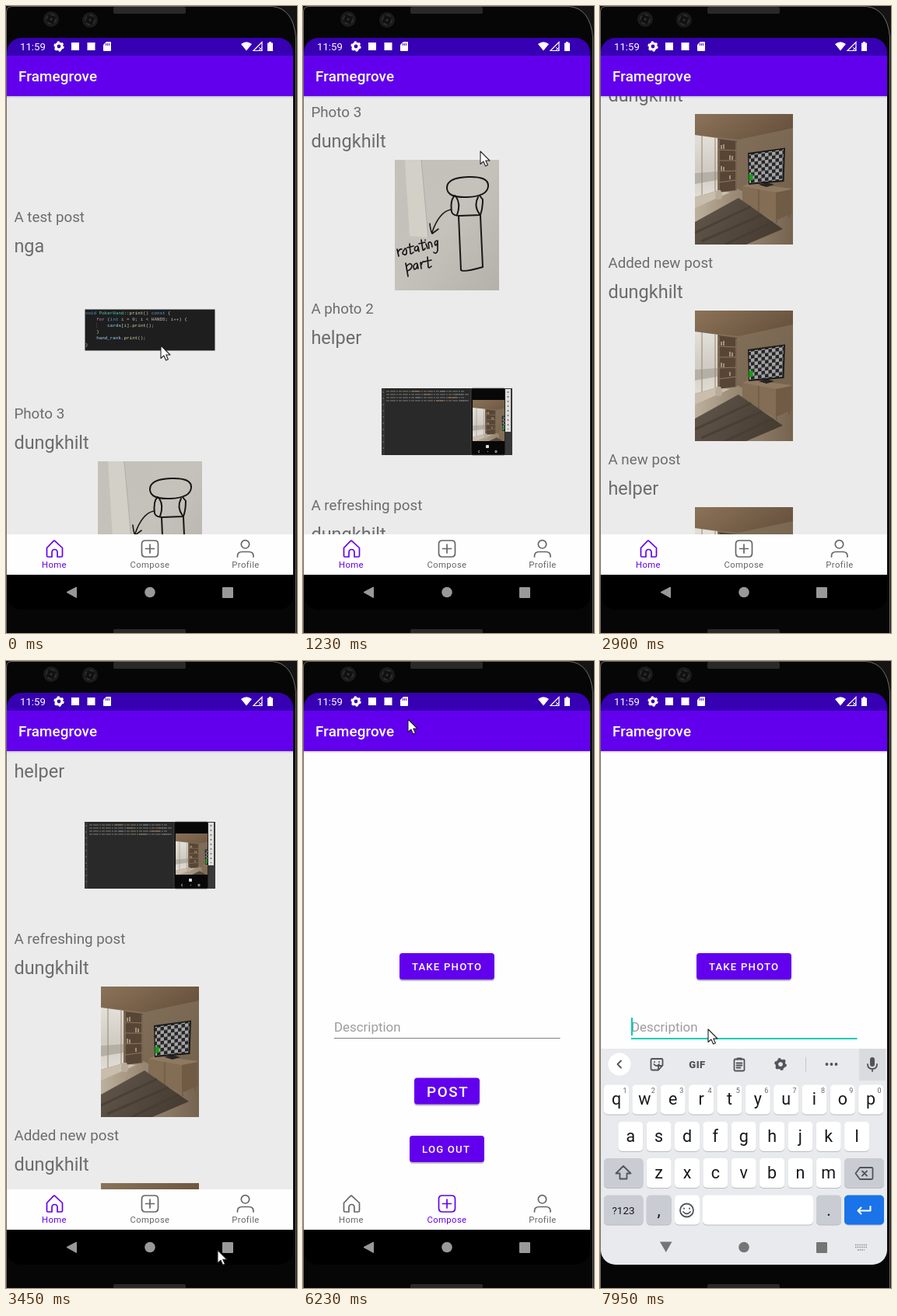
Animation of 374x807 px, one loop 8000 ms. Source, as an HTML page:

```html
<!DOCTYPE html>
<html lang="en">
<head>
<meta charset="utf-8">
<title>Photo feed</title>
<style>
html, body { margin: 0; width: 100%; height: 100%; overflow: hidden; background: #000; }
svg { display: block; width: 374px; height: 807px; font-family: Roboto, sans-serif; }
svg svg { width: auto; height: auto; }
.line { fill: none; stroke: currentColor; stroke-width: 1.7; stroke-linejoin: round; stroke-linecap: round; }
.desc { font-size: 18.8px; fill: #6c6c6c; }
.user { font-size: 23.5px; fill: #6c6c6c; }
.code { font: 5.9px "Liberation Mono", monospace; fill: #c4c4c4; white-space: pre; }
.tab { font-size: 11.3px; letter-spacing: .38px; text-anchor: middle; fill: currentColor; }
.btn { font-weight: 500; font-size: 13.2px; letter-spacing: 1.18px; fill: #fff; }
.key { font-size: 21.5px; text-anchor: middle; fill: #17181b; }
.num { font-size: 9px; text-anchor: middle; fill: #5f6368; }
.icon { fill: none; stroke: #50555b; stroke-width: 1.8; stroke-linecap: round; stroke-linejoin: round; }
</style>
</head>
<body>
<svg viewBox="0 0 374 807">
  <defs>
    <clipPath id="screen"><rect x="1" y="41" width="368" height="736" rx="19"/></clipPath>
    <clipPath id="page"><rect x="1" y="116" width="368" height="564"/></clipPath>
    <clipPath id="roomClip"><rect width="126" height="168"/></clipPath>
    <linearGradient id="paper" x2="1" y2="1">
      <stop stop-color="#c3c1ba"/><stop offset=".5" stop-color="#c4c2bb"/><stop offset="1" stop-color="#b3b1aa"/>
    </linearGradient>
    <linearGradient id="ceiling" x2="1" y2=".4">
      <stop stop-color="#8b7358"/><stop offset="1" stop-color="#6a543f"/>
    </linearGradient>
    <linearGradient id="wall" x2="1" y2="1">
      <stop stop-color="#87755f"/><stop offset="1" stop-color="#715e4a"/>
    </linearGradient>
    <linearGradient id="floor">
      <stop stop-color="#bcb09e"/><stop offset=".4" stop-color="#9b8b75"/><stop offset="1" stop-color="#75634f"/>
    </linearGradient>
    <linearGradient id="rug" x2="1" y2=".3">
      <stop stop-color="#62574b"/><stop offset="1" stop-color="#483d33"/>
    </linearGradient>
    <linearGradient id="glass" x2="0" y2="1">
      <stop stop-color="#e3e0da"/><stop offset=".55" stop-color="#d0ccc4"/><stop offset="1" stop-color="#e0ddd6"/>
    </linearGradient>
    <linearGradient id="shade" x2="0" y2="1">
      <stop stop-opacity=".16"/><stop offset="1" stop-opacity="0"/>
    </linearGradient>
    <pattern id="check" width="9" height="9" patternUnits="userSpaceOnUse" patternTransform="skewY(-8)">
      <rect width="9" height="9" fill="#252525"/><path d="M0 0h4.500v9h4.500v-4.500H0z" fill="#a4a4a6"/>
    </pattern>
    <g id="gear">
      <circle r="4" fill="none" stroke="currentColor" stroke-width="3.2"/>
      <circle r="5.7" fill="none" stroke="currentColor" stroke-width="2" stroke-dasharray="2.9 3.07"/>
    </g>
    <g id="room" clip-path="url(#roomClip)">
      <rect width="126" height="168" fill="url(#wall)"/>
      <path d="M0 0H126V18L56 33 0 27z" fill="url(#ceiling)"/>
      <path d="M0 27L29 31V99L0 107z" fill="url(#glass)"/>
      <path d="M0 76L29 74V85L0 90z" fill="#b5b0a6"/>
      <path d="M9 28V105M26 31V100" stroke="#94866f" stroke-width="1"/>
      <path d="M0 107L52 95 126 130V168H0z" fill="url(#floor)"/>
      <path d="M0 107L29 99 45 101 0 121z" fill="#c9bead"/>
      <path d="M30 32L54 35V98L30 101z" fill="#574635"/>
      <path d="M31 46L53 47M31 60H53M31 74L53 73M31 88L53 85M31 33V100M53 36V98" stroke="#8d7660" stroke-width="1.2"/>
      <path d="M34 45V40M37 45V39M45 59V53M48 59V54M34 73V67M37 73V68M45 84V79" stroke="#a09079" stroke-width="2"/>
      <path d="M61 93L70 89 124 96V104L85 101z" fill="#8f7960"/>
      <path d="M61 93L104 101V137L61 118z" fill="#836d54"/>
      <path d="M104 101L124 97V128L104 137z" fill="#705b45"/>
      <path d="M82 97V127M64 119V124M105 137V141M121 129V134" stroke="#604c39" stroke-width=".8"/>
      <path d="M82 91L92 88 102 91 92 94z" fill="#272321"/>
      <path d="M68 50L116 43.5 114.500 87 69 91z" fill="#1c1b1b"/>
      <path d="M69.500 52L114 45.500 112.500 85 70 89z" fill="url(#check)"/>
      <path d="M69.500 78l5-1v8l-5 1z" fill="#12a012"/>
      <path d="M0 139L56 108 113 148 66 168H0z" fill="url(#rug)"/>
      <path d="M0 153L72 119M8 164L86 130M39 168L100 139" stroke="#463b31" stroke-width="3" opacity=".7"/>
      <path d="M28 98q-4 8 0 12h5q4-4 0-12z" fill="#b8ab99"/>
    </g>
    <g id="sketch">
      <rect width="134" height="168" fill="url(#paper)"/>
      <path d="M13 0H34L43 100 19 98z" fill="#d2d0c7"/>
      <path d="M34 0L43 100" stroke="#aeaca5"/>
      <g fill="none" stroke="#171717" stroke-width="2" stroke-linecap="round" stroke-linejoin="round">
        <path d="M67 36Q67 23 94 22T120 34Q119 47 93 48T67 36z"/>
        <path d="M77 46Q71 51 73 67 75 72 83 72L110 71Q113 63 113 51L109 46M79 48Q85 57 80 71M107 48Q101 59 109 70"/>
        <path d="M82 72L85 142Q88 145 113 138L110 72"/>
        <path d="M72 64Q57 67 48 93M45 82Q46 92 48 95L56 89" stroke-width="1.6"/>
        <path d="M3 115l2 9M4 119q2-5 5-4M12 116q-4 5 0 6t3-5-3-1M19 108l1 12q1 2 4-1M16 113l8-2M29 111q-5 1-3 6 4 1 4-5l1 6M34 103l2 13q1 1 3-2M31 108l8-2M40 108l2 6M39 103v.5M44 114l-1-7q4-4 5 5M54 104q-4 1-2 6 3 0 3-6l0 13q-2 5-5 2" stroke-width="1.7"/>
        <path d="M14 133l3 17M15 137q5-6 7-1 0 5-6 7M28 133q-6 2-3 8 4 0 4-7l1 6M33 132l1 8M34 135q1-5 5-4M42 125l1 13q1 2 4-1M38 131l9-2" stroke-width="1.7"/>
      </g>
    </g>
    <g id="code">
      <rect width="167" height="53" fill="#1e1e1e"/>
    </g>
    <g id="shot">
      <rect width="168" height="86" fill="#292929"/>
      <rect width="4" height="86" fill="#353535"/>
      <path d="M2 4V80" stroke="#757575" stroke-dasharray="2 6"/>
      <path d="M6 4H106M6 8H112M6 12H107M6 16H112" stroke="#7d7d77" stroke-width="1.1" stroke-dasharray="4 1 7 1 2 1"/>
      <path d="M39 4h9M54 8h8M85 12h12M70 16h9" stroke="#967050"/>
      <path d="M75 4h7M95 8h10M44 12h6M100 16h8" stroke="#5d7491"/>
      <rect x="115" width="44" height="86" rx="2" fill="#080808" stroke="#565656" stroke-width=".7"/>
      <svg x="117" y="15" width="41" height="53" viewBox="0 6 74 112" preserveAspectRatio="none"><use href="#room"/></svg>
      <path d="M126 83l-2-1.500 2-1.500M136 81.500h1M146 80.500h2v2h-2z" fill="none" stroke="#aaa"/>
      <rect x="134" y="73" width="4" height="4" rx="1" fill="#ddd"/>
      <rect x="159" width="9" height="86" fill="#383838"/>
      <rect x="159" y="1" width="7" height="55" fill="#dededc"/>
      <path d="M162.500 4V53" stroke="#888" stroke-width="2" stroke-dasharray="2 4"/>
    </g>
  </defs>

  <rect width="374" height="807" fill="#141414"/>
  <path d="M.5 808V8Q.5 .5 8 .5H342Q369 3 372.500 40V808z" fill="#060606" stroke="#6e6e6e"/>
  <g fill="#292929">
    <rect x="138" y="1" width="93" height="9" rx="2"/><rect x="138" y="802" width="93" height="9" rx="2"/>
  </g>
  <g id="lenses"></g>

  <g clip-path="url(#screen)">
    <rect y="41" width="374" height="740" fill="#000"/>
    <rect y="41" width="374" height="23" fill="#3700b3"/>
    <rect y="64" width="374" height="52" fill="#6200ee"/>
    <g fill="#fff" color="#fff">
      <text x="18" y="57" font-size="13.2">11:59</text>
      <use href="#gear" x="68" y="52"/>
      <rect x="84" y="47" width="10" height="10"/><rect x="104.500" y="47" width="10" height="10"/>
      <path d="M129 46h5q1 0 1 1v10q0 1-1 1h-8q-1 0-1-1v-7z"/>
      <path d="M128.500 48v3M130.500 48v3M132.500 48v3" stroke="#3700b3" stroke-width=".9"/>
      <path d="M302 49q7-5.500 14 0l-7 8.500z"/>
      <path d="M318 57.500L329 46.500V57.500z" fill="none" stroke="#fff" stroke-width="1.200"/>
      <path d="M325 53l4 4M329 53l-4 4" stroke="#fff"/>
      <path d="M336 47.500h2v-1.500h3v1.500h2v10.500h-7z"/>
      <text x="16" y="97" font-weight="500" font-size="18.8" letter-spacing=".14">Framegrove</text>
    </g>

    <g clip-path="url(#page)">
      <rect y="116" width="374" height="564" fill="#ebebeb"/>
      <g id="feed"></g>
    </g>

    <g id="compose">
      <rect y="116" width="374" height="564" fill="#fefefe"/>
      <g id="buttons"></g>
      <text x="40" y="477" font-size="16.9" fill="#9c9c9c">Description</text>
      <rect id="rule" x="40" y="485" width="290.500"/>
      <rect id="caret" x="40" y="459" width="2" height="23" fill="#03cdbb"/>
    </g>
    <rect y="116" width="374" height="3" fill="url(#shade)"/>

    <rect y="680" width="374" height="52" fill="#fefefe"/>
    <g id="homeTab">
      <path class="line" d="M52.500 697.500L60.800 688.800Q62 687.500 63.200 688.800L72.500 697.500V707.500Q72.500 709 71 709H66V703.500Q66 699.500 62.500 699.500T59 703.500V709H54Q52.500 709 52.500 707.500z"/>
      <text class="tab" x="62" y="722.500">Home</text>
    </g>
    <g id="composeTab">
      <path class="line" d="M179 688h12q4.500 0 4.500 4.500v11.500q0 5-4.500 5h-12q-4.500 0-4.500-5v-11.500q0-4.500 4.500-4.500zM185 693v11M179.500 698.500h11"/>
      <text class="tab" x="185" y="722.500">Compose</text>
    </g>
    <g color="#666">
      <circle class="line" cx="307.500" cy="692.800" r="5.200"/>
      <path class="line" d="M297.500 709v-1q0-5.500 6-5.500h8.500q6 0 6 5.500v1"/>
      <text class="tab" x="308" y="722.500">Profile</text>
    </g>
    <g fill="#999" stroke-linejoin="round">
      <path d="M78 754.500L90.500 748V761.500z" stroke="#999"/><circle cx="185" cy="754.500" r="6.800"/><rect x="278" y="748" width="14" height="14" rx="1"/>
    </g>

    <g id="keyboard">
      <rect y="499" width="374" height="280" fill="#e8eaed"/>
      <rect x="333" y="499" width="34" height="41" fill="#d9dbdf"/>
      <circle cx="25" cy="519" r="14.500" fill="#fff"/>
      <g class="icon">
        <path d="M27 514.500l-4.500 4.500 4.500 4.500"/>
        <path d="M67 512h12q1.500 0 1.500 1.500v7l-5.500 6H67q-1.500 0-1.500-1.500v-11.500q0-1.500 1.500-1.500zM75 526v-5h5M69.500 519q3 4 6.500 0M70 516v.2M76 516v.2"/>
        <path d="M174 512.500h10q1.500 0 1.500 1.500v12q0 1.500-1.500 1.500h-10q-1.500 0-1.500-1.500v-12q0-1.500 1.500-1.500zM176.500 513v-1.500h5v1.500M175.500 517.500h7M175.500 520.500h7M175.500 523.500h5"/>
        <path d="M264.500 510v19" stroke="#c4c7cc" stroke-width="1"/>
        <path d="M344 519q0 6 6 6t6-6M350 525v3"/>
      </g>
      <g fill="#50555b" color="#50555b">
        <text x="125" y="523.500" font-size="13" font-weight="900" text-anchor="middle" letter-spacing=".5">GIF</text>
        <g transform="translate(232 519) scale(1.18)"><use href="#gear"/></g>
        <circle cx="291.500" cy="519" r="1.900"/><circle cx="297.500" cy="519" r="1.900"/><circle cx="303.500" cy="519" r="1.900"/>
        <rect x="347" y="510" width="6" height="12" rx="3"/>
      </g>
      <g id="keys"></g>
      <g class="icon">
        <path d="M30 650l-9.500 9.500h5v7h9v-7h5z"/>
        <path d="M334 652h15q1.500 0 1.500 1.500v12q0 1.500-1.500 1.500h-15l-5.500-7.500zM337 656.500l6 6M343 656.500l-6 6"/>
        <circle cx="111.500" cy="707" r="8.500"/>
        <path d="M108 704.500v.4M115 704.500v.4M107 709q4.500 5 9 0"/>
        <path d="M347.500 702v5.500H331.500M335.500 703.500l-4 4 4 4" stroke="#fff" stroke-width="2"/>
      </g>
      <g fill="#757575">
        <path d="M77 747.500H92.500L84.800 761z"/><circle cx="185" cy="754.500" r="6.800"/><rect x="278" y="748" width="14" height="14" rx="1"/>
      </g>
      <path d="M328 751.500h15M328 754.500h15M331 758h9" stroke="#8b8b8b" stroke-width="1.500" stroke-dasharray="1.500 1.200"/>
    </g>
  </g>

  <path id="pointer" d="M0 0V16.500L3.900 13 6.600 19 9.400 17.800 6.800 12H12z" fill="#fff" stroke="#222" stroke-width="1.100" stroke-linejoin="round"/>
</svg>

<script>
const $ = id => document.getElementById(id);
const LOOP = 8000, ROW = 253, PURPLE = '#6200ee', GREY = '#666';

// Bursts of picture changes: first time, last time, number of steps
const bursts = [
  [120, 1110, 8], [1230, 2200, 8], [2320, 3310, 8], [3450, 4440, 8],
  [4570, 5080, 5], [5380, 5780, 4], [6230, 7160, 8], [7280, 7950, 6]
];

// Time, list offset
const scroll = [
  [0, 119], [260, 165], [550, 330], [830, 462], [1110, 507], [1230, 507],
  [1370, 400], [1510, 230], [1650, 70], [1780, 0], [1910, 0], [2050, 90], [2200, 320],
  [2460, 720], [2700, 980], [2870, 1072], [2920, 1072], [3030, 1030], [3170, 900], [3310, 796], [3450, 792]
];

// Time, pointer x, pointer y
const path = [
  [0, 199, 437], [120, 199, 437], [550, 212, 310], [1110, 228, 187], [1240, 228, 187],
  [1510, 200, 410], [1780, 160, 657], [1910, 161, 655], [2200, 185, 400], [2460, 230, 240],
  [2740, 300, 210], [2860, 395, 215], [2920, 395, 220], [3030, 306, 330], [3310, 300, 665],
  [3460, 270, 765], [3590, 240, 830], [4150, 225, 830], [4440, 203, 740], [4570, 193, 701],
  [5370, 193, 701], [5380, 210, 640], [5513, 220, 490], [5647, 182, 215], [5780, 135, 75],
  [6235, 135, 75], [6500, 96, 215], [6630, 77, 320], [6895, 200, 490], [7160, 139, 474]
];

function at(keys, t) {
  const i = keys.findIndex(k => k[0] > t);
  if (i < 0) return keys[keys.length - 1].slice(1);
  const [a, b] = [keys[i - 1], keys[i]];
  const p = (t - a[0]) / (b[0] - a[0]);
  return a.slice(1).map((v, n) => v + (b[n + 1] - v) * p);
}

function snap(t) {
  let shown = 0;
  for (const [start, end, count] of bursts) {
    const gap = (end - start) / (count - 1);
    if (t >= start) shown = start + gap * Math.min(count - 1, Math.floor((t - start) / gap + .15));
  }
  return shown;
}

const posts = [
  ['Test user', 'dungkhilt'],
  ['A test post', 'nga', 'code', 167, 53],
  ['Photo 3', 'dungkhilt', 'sketch', 134, 168],
  ['A photo 2', 'helper', 'shot', 168, 86],
  ['A refreshing post', 'dungkhilt', 'room', 126, 168],
  ['Added new post', 'dungkhilt', 'room', 126, 168],
  ['A new post', 'helper', 'room', 126, 168]
];

const span = (color, text) => `<tspan fill="${color}">${text}</tspan>`;
const codeLines = [
  [0, span('#569cd6', 'void ') + span('#4ec9b0', 'PokerHand') + '::' + span('#dcdcaa', 'print') + '() ' + span('#569cd6', 'const') + ' {'],
  [4, span('#c586c0', 'for') + ' (' + span('#569cd6', 'int') + ' i = 0; i &lt; HANDS; i++) {'],
  [8, span('#9cdcfe', 'cards') + '[i].' + span('#dcdcaa', 'print') + '();'],
  [4, '}'],
  [4, span('#9cdcfe', 'hand_rank') + '.' + span('#dcdcaa', 'print') + '();'],
  [0, '}']
];

function build() {
  $('lenses').innerHTML = [[58, 17], [108, 18]].map(([x, y]) =>
    `<circle cx="${x}" cy="${y}" r="10" fill="#1b1b1b"/>
     <circle cx="${x}" cy="${y}" r="6" fill="#111" stroke="#333" stroke-width="1.5" stroke-dasharray="5 4"/>
     <circle cx="${x}" cy="${y}" r="1.500" fill="#333"/>`).join('');

  $('code').innerHTML += codeLines.map(([indent, text], i) =>
    `<text class="code" x="${.5 + indent * 3.54}" y="${6 + i * 8.2}">${text}</text>`).join('') +
    '<path d="M15 17v7" stroke="#444" stroke-width=".6"/>';

  $('feed').innerHTML = posts.map(([desc, user, pic, w, h], i) => {
    const y = 116 + i * ROW;
    return `<text class="desc" x="10.400" y="${y + 27.5}">${desc}</text>
      <text class="user" x="10.400" y="${y + 67}">${user}</text>` +
      (pic ? `<use href="#${pic}" x="${185 - w / 2}" y="${y + 167 - h / 2}"/>` : '');
  }).join('');

  const button = (x, y, w, text, style = '', base = 22.4) =>
    `<rect x="${x}" y="${y + 1.5}" width="${w}" height="34.500" rx="4" fill="#000" opacity=".25"/>
     <rect x="${x}" y="${y}" width="${w}" height="34" rx="3.800" fill="${PURPLE}"/>
     <text class="btn" x="${x + 16}" y="${y + base}" style="${style}">${text}</text>`;
  $('buttons').innerHTML = button(124, 376, 122, 'TAKE PHOTO') +
    button(143, 536.5, 84, 'POST', 'font-size:18.8px;letter-spacing:1.68px', 24.5) +
    button(137, 611, 96, 'LOG OUT');

  const cap = (x, y, w, fill = '#fff') =>
    `<rect x="${x}" y="${y + 1}" width="${w}" height="38" rx="5" fill="#b9bcc2"/>
     <rect x="${x}" y="${y}" width="${w}" height="38" rx="5" fill="${fill}"/>`;
  const row = (letters, x, y, nums) => [...letters].map((c, i) => {
    const left = x + i * 36.35;
    return cap(left, y, 32) + `<text class="key" x="${left + 16}" y="${y + 25.5}">${c}</text>` +
      (nums ? `<text class="num" x="${left + 27}" y="${y + 10}">${(i + 1) % 10}</text>` : '');
  }).join('');
  const dark = '#c9ccd2';
  $('keys').innerHTML = row('qwertyuiop', 5, 545.5, true) + row('asdfghjkl', 23.3, 593) + row('zxcvbnm', 59.7, 640) +
    cap(5, 640, 50.5, dark) + cap(314, 640, 51, dark) +
    cap(5, 687.5, 50.5, dark) + cap(59.7, 687.5, 32, dark) + cap(96, 687.5, 32) +
    cap(132, 687.5, 142) + cap(278, 687.5, 32, dark) + cap(314, 687.5, 51, '#1a73e8') +
    `<text class="key" x="30" y="712" style="font-size:13.5px">?123</text>
     <text class="key" x="75.700" y="714">,</text><text class="key" x="294" y="714">.</text>`;
}

function draw(time) {
  const t = snap(time);
  const composing = t >= 4820, focused = t >= 7400;
  const show = (id, on) => $(id).setAttribute('display', on ? 'inline' : 'none');

  $('feed').setAttribute('transform', `translate(0 ${-Math.round(at(scroll, t)[0])})`);
  show('compose', composing);
  $('homeTab').setAttribute('color', composing ? GREY : PURPLE);
  $('composeTab').setAttribute('color', composing ? PURPLE : GREY);

  show('caret', focused);
  $('rule').setAttribute('height', focused ? 2 : 1);
  $('rule').setAttribute('fill', focused ? '#03cdbb' : '#808080');

  const rise = Math.min(1, Math.max(0, (t - 7440) / 340));
  show('keyboard', rise > 0);
  $('keyboard').setAttribute('transform', `translate(0 ${280 * (1 - rise) ** 2})`);

  const [x, y] = at(path, t);
  $('pointer').setAttribute('transform', `translate(${x} ${y})`);
}

build();
const begin = performance.now();
function tick() {
  draw((performance.now() - begin) % LOOP);
  requestAnimationFrame(tick);
}
tick();
</script>
</body>
</html>
```
